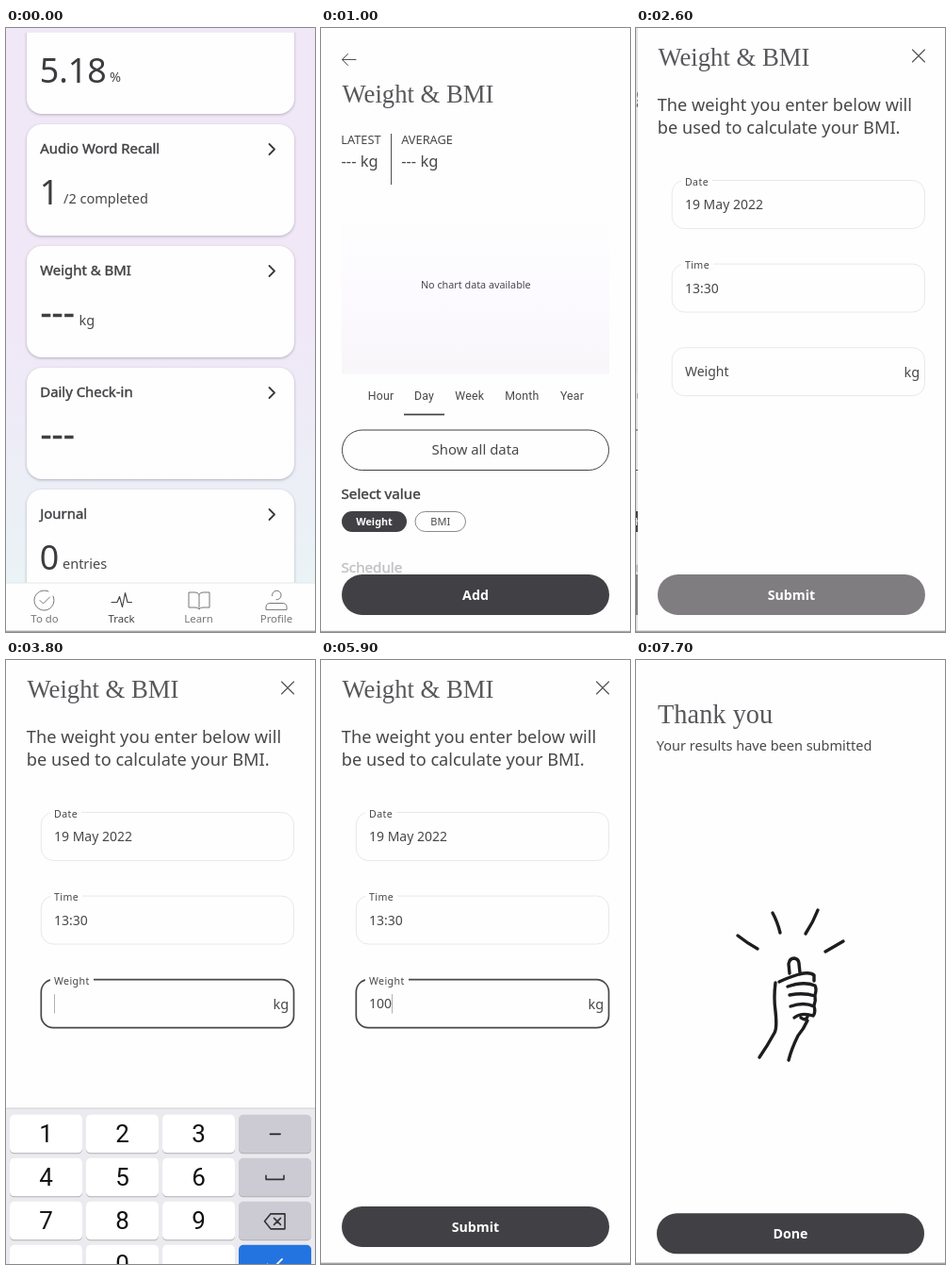
An HTML page that plays this animation: 328x640 px, repeating every 8000 ms.

```html
<!DOCTYPE html>
<html lang="en">
<head>
<meta charset="utf-8">
<title>Weight entry</title>
<style>
  html, body { margin: 0; width: 100%; height: 100%; overflow: hidden; background: #fefefe; }
  #stage { display: block; width: 100%; height: 100%; }
  text { font-family: "Noto Sans", sans-serif; white-space: pre; }
  .serif { font-family: "Liberation Serif", serif; }
  .roboto { font-family: Roboto, sans-serif; }
  .card { filter: drop-shadow(0 1px 1.5px rgba(40, 30, 50, .3)); }
  .key { filter: drop-shadow(0 1px .5px rgba(0, 0, 0, .25)); }
  path { fill: none; stroke-linecap: round; stroke-linejoin: round; }
</style>
</head>
<body>
<svg id="stage" viewBox="0 0 328 640"></svg>
<script>
const W = 328, H = 640, LOOP = 8000, STEP = 100;
const INK = '#414145', TEXT = '#48484b', PAGE = '#fefefe';
const stage = document.getElementById('stage');

// Drawing helpers
const text = (x, y, str, size, attrs = '', fill = TEXT) =>
  `<text x="${x}" y="${y}" font-size="${size}" fill="${fill}" ${attrs}>${str}</text>`;
const centred = (x, y, str, size, attrs = '', fill = TEXT) =>
  text(x, y, str, size, `text-anchor="middle" ${attrs}`, fill);
// Medium weight: regular letters with a hairline outline
const medium = (x, y, str, size, fill = INK) =>
  text(x, y, str, size, `stroke="${fill}" stroke-width=".4"`, fill);
const rect = (x, y, w, h, fill, r = 0, attrs = '') =>
  `<rect x="${x}" y="${y}" width="${w}" height="${h}" rx="${r}" fill="${fill}" ${attrs}/>`;
const path = (d, stroke = INK, width = 1) =>
  `<path d="${d}" stroke="${stroke}" stroke-width="${width}"/>`;
const title = (x, y, str, size) => text(x, y, str, size, 'class="serif"', '#58585c');
const page = () => rect(0, 0, W, H, PAGE) + rect(0, 638.6, W, 1.4, '#a4a4a4');
const BOLD = 'font-weight="600"';

// Timing helpers
const clamp = x => Math.min(1, Math.max(0, x));
const progress = (t, start, duration) => clamp((t - start) / duration);

// Cubic curve (.4, 0, .2, 1)
function ease(x) {
  let lo = 0, hi = 1;
  for (let i = 0; i < 24; i++) {
    const s = (lo + hi) / 2;
    const at = 1.2 * s * (1 - s) ** 2 + .6 * s * s * (1 - s) + s ** 3;
    if (at < x) lo = s; else hi = s;
  }
  return 3 * lo * lo * (1 - lo) + lo ** 3;
}

// Touch ripple confined to a rounded box
function ripple(t, start, cx, cy, box, fill, opacity) {
  if (t < start) return '';
  const [x, y, w, h, r] = box;
  return `<clipPath id="ripple${start}">${rect(x, y, w, h, '#000', r)}</clipPath>
    <circle cx="${cx}" cy="${cy}" r="${106 + 1.4 * (t - start)}" fill="${fill}"
      opacity="${opacity}" clip-path="url(#ripple${start})"/>`;
}

function button(y, label, fill = INK, effect = '') {
  return rect(22, y, 284, 43, fill, 21.5) + effect +
    centred(164, y + 27, label, 14.2, BOLD, '#fff');
}

// Track screen
function card(y, name, value, unit, unitX, effect = '') {
  const number = value === '---'
    ? medium(36.5, y + 83.5, value, 37.5)
    : text(35.8, y + 85, value, 35.8, '', '#3c3c40');
  const heading = medium(36.3, y + 30.5, name, 14.9) +
    path(`M279.5 ${y + 21}l5.5 5.5l-5.5 5.5`, '#39393c', 1.8);
  return rect(22, y, 284, 118, PAGE, 16, 'class="card"') + effect +
    (name && heading) + number + text(unitX, y + 84, unit, 14.5);
}

function trackScreen(t) {
  const grey = '#77777b';
  const tap = ripple(t, 500, 165, 290, [22, 231, 284, 118, 16], '#000', .165);
  return `<linearGradient id="sky" x2="0" y2="1">
      <stop offset=".5" stop-color="#f0e8f7"/><stop offset=".92" stop-color="#eaf3f6"/>
    </linearGradient>` +
    rect(0, 0, W, H, 'url(#sky)') +
    card(-27, '', '5.18', '%', 110) +
    card(102, 'Audio Word Recall', '1', '/2 completed', 61) +
    card(231, 'Weight &amp; BMI', '---', 'kg', 77.5, tap) +
    card(360, 'Daily Check-in', '---', '', 0) +
    card(489, 'Journal', '0', 'entries', 60) +
    rect(0, 0, W, 5, '#f0e8f7') +
    rect(0, 588, W, 52, PAGE) + rect(0, 587.5, W, 1, '#e8e6ea') + rect(0, 638.6, W, 1.4, '#a4a4a4') +
    path('M45 597a10.5 10.5 0 1 0 5 5M36 606.5l3.5 3.5l7-7', grey) +
    path('M112 608.5h6l2.5-6l3 11l3-15l2.5 10h4.5', INK, 1.1) +
    path('M205 600.5q-1-2.5-4-2.5h-7v16h7q3 0 4 2q1-2 4-2h7v-16h-7q-3 0-4 2.5v15', grey) +
    path('M282.5 601.5a4.8 4.8 0 1 1 4.5 4.3M276 616v-2.5q0-4 5-4h12q5 0 5 4v2.5z', grey) +
    centred(41, 630, 'To do', 11.4, '', grey) +
    centred(122.5, 630, 'Track', 11.4, '', INK) +
    centred(204.5, 630, 'Learn', 11.4, '', grey) +
    centred(287, 630, 'Profile', 11.4, '', grey);
}

// Chart screen
function chartScreen(t) {
  const tabs = [[63.5, 'Hour'], [109.5, 'Day'], [157.7, 'Week'], [213.3, 'Month'], [266.5, 'Year']];
  return `<linearGradient id="haze" x2="0" y2="1">
      <stop stop-color="${PAGE}"/><stop offset=".5" stop-color="#fcfafe"/><stop offset="1" stop-color="#f8f6f9"/>
    </linearGradient>` +
    page() +
    path('M37 33.5H22.5l6-6m-6 6l6 6', '#505054') +
    title(22.5, 79, 'Weight &amp; BMI', 26.7) +
    text(21.2, 123, 'LATEST', 12.8) + text(85.2, 123, 'AVERAGE', 12.8) +
    text(21.5, 147, '--- kg', 16.5) + text(85.2, 147, '--- kg', 16.5) +
    rect(74, 112, 1.1, 54, '#555') +
    rect(22, 190, 284, 176.5, 'url(#haze)') +
    centred(164.3, 276, 'No chart data available', 10.8) +
    tabs.map(([x, name]) => centred(x, 394, name, 12.3, 'class="roboto" letter-spacing=".2"')).join('') +
    rect(88, 408.7, 43, 1.7, INK) +
    rect(22.5, 426, 283, 42.5, PAGE, 21.2, `stroke="${INK}"`) +
    centred(164, 452, 'Show all data', 14.9) +
    medium(21.5, 499, 'Select value', 15.2) +
    rect(22, 512, 69, 22, INK, 11) + centred(56.5, 527, 'Weight', 10.8, BOLD, '#fff') +
    rect(100, 512.5, 53.5, 21, PAGE, 10.5, 'stroke="#8a8a8e"') + centred(126.8, 527, 'BMI', 11) +
    medium(21.5, 577, 'Schedule', 15.2, '#c2c2c5') +
    rect(0, 579, W, 59.6, PAGE) +
    button(579, 'Add', INK, ripple(t, 2200, 177.5, 598, [22, 579, 284, 43, 21.5], '#fff', .39));
}

// Entry form
function field(y, label, value, notch, active = false) {
  const outline = active ? 'stroke="#48484b" stroke-width="1.7"' : 'stroke="#e8e8ea"';
  return rect(37.3, y, 268.2, 51, PAGE, 13, outline) +
    (label ? rect(47, y - 3, notch, 6, PAGE) + text(51, y + 5.2, label, 10.6, 'letter-spacing=".4"') : '') +
    text(51, y + 30.5, value, 14);
}

function keyboard(t, shift) {
  const rows = ['123-', '456_', '789<', ',0.!'];
  const pressed = t === 4400 ? '1' : t >= 5000 && t < 5200 ? '0' : '';
  const icons = {
    '-': path('M280.5 475.5h10.5', '#222', 1.8),
    '_': path('M276 519.5v4h19v-4', '#333', 1.6),
    '<': path('M281 560h15v16h-15l-6.5-8zM284.5 564.5l7 7m0-7l-7 7', '#333', 1.6),
    '!': path('M277.5 613.5l5 5l10.5-10.5', '#fff', 1.8)
  };
  const keys = rows.map((row, j) => [...row].map((char, i) => {
    const x = 4 + 81 * i, y = 455 + 46 * j;
    const fill = char === '!' ? '#2374e1' : i === 3 ? '#cccbd4' : char === pressed ? '#d3d3da' : '#fff';
    return rect(x, y, 77, 40.5, fill, 5, 'class="key"') +
      (icons[char] || centred(x + 38.5, y + 29.5, char, 26, 'class="roboto"', '#111'));
  }).join('')).join('');
  return `<g transform="translate(0 ${shift})">
    ${rect(0, 447.5, W, 200, '#dcdce0')}${rect(0, 449, W, 200, '#eaeaef')}${keys}</g>`;
}

function formScreen(t) {
  const focused = t >= 3600;
  const value = t < 4400 ? '' : t < 5000 ? '1' : t < 5100 ? '10' : '100';
  const hidden = t < 5600 ? (1 - progress(t, 3600, 500)) ** 3.85 : ease(progress(t, 5600, 300));
  const covered = t >= 3700 && t < 5900;
  const loading = t >= 6700;
  let action = '';
  if (!covered) {
    const tap = ripple(t, 6600, 164, 600, [22, 579, 284, 43, 21.5], '#fff', .33);
    action = button(579, loading ? '' : 'Submit', !value || loading ? '#7f7d7f' : INK, loading ? '' : tap);
  }
  if (loading) {
    const spin = (t - 6800) * .36;
    action += `<g transform="rotate(${spin} 164 600)">${path('M171.5 588A14.5 14.5 0 0 1 178 604.5', '#fff', 3)}</g>`;
  }
  return page() +
    title(22.5, 40, 'Weight &amp; BMI', 26.7) +
    path('M292.5 23l13 13m0-13l-13 13', '#505054', 1.1) +
    text(21.8, 88, 'The weight you enter below will', 18.2) +
    text(21.8, 112, 'be used to calculate your BMI.', 18.2) +
    field(161.5, 'Date', '19 May 2022', 33) +
    field(250, 'Time', '13:30', 34) +
    field(338.7, focused ? 'Weight' : '', focused ? value : 'Weight', 46, focused) +
    text(283.5, 370, 'kg', 14.5) +
    (focused && t < 6200 ? rect(51 + value.length * 8, 354, .9, 20.5, '#aaaaae') : '') +
    action +
    (covered ? keyboard(t, hidden * 192) : '');
}

// Confirmation screen
function thanksScreen() {
  const strokes = [
    'M108 292Q118 300 129 306', 'M145 268Q150 277 153 289', 'M193 265Q188 278 180 290', 'M220 298L201 309',
    'M163 332L162 322Q163 316 168 316Q173 317 173 322L174 331',
    'M152 341Q160 337 173 333Q185 330 189 334V340',
    'M161 346Q178 340 190 345Q192 349 190 355',
    'M163 355Q178 352 190 356Q191 361 189 366',
    'M164 367Q178 362 189 367Q191 373 188 377',
    'M168 379Q176 373 188 377M175 379Q180 383 182 378',
    'M148 342Q146 358 148 372Q150 390 147 395Q140 408 131 421',
    'M182 382Q178 391 172 398Q165 412 162 424'
  ];
  return page() +
    title(23, 67, 'Thank you', 28.4) +
    text(21.8, 96, 'Your results have been submitted', 14.5) +
    path(strokes.join(''), '#1d1d1f', 3.4) +
    button(586.3, 'Done');
}

const screens = [trackScreen, chartScreen, formScreen, thanksScreen];
const slideStarts = [585, 2285, 7350], SLIDE = 350;

function render(t) {
  const index = slideStarts.filter(start => t >= start).length;
  const p = index ? ease(progress(t, slideStarts[index - 1], SLIDE)) : 1;
  if (p > .999) return screens[index](t);
  // The new screen is uncovered twice as fast as its content travels.
  const edge = W * (1 - p);
  return `<g transform="translate(${-.2 * W * p})">${screens[index - 1](t)}</g>
    ${rect(0, 0, W, H, '#000', 0, `opacity="${.11 * p}"`)}
    <svg x="${edge}" width="${W}" height="${H}" overflow="hidden">
      <g transform="translate(${-edge / 2})">${screens[index](t)}</g>
    </svg>`;
}

let shown = -1;
const origin = performance.now();
function tick() {
  const elapsed = (performance.now() - origin) % LOOP;
  const t = Math.floor(elapsed / STEP) * STEP;
  if (t !== shown) stage.innerHTML = render(shown = t);
  requestAnimationFrame(tick);
}
tick();
</script>
</body>
</html>
```
